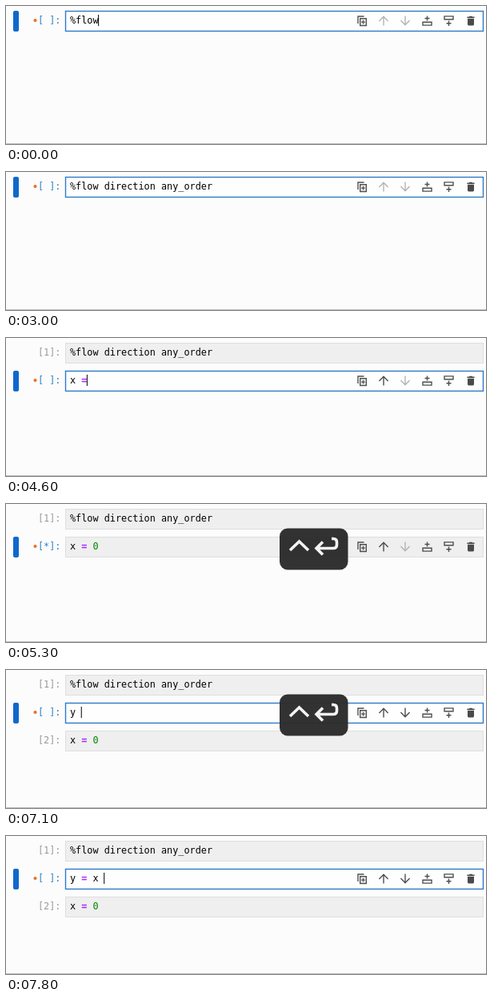
Animation, 600 px wide and 173 px high, one loop 8 s. Source, as an HTML page:

```html
<!DOCTYPE html>
<html lang="en">
<head>
<meta charset="utf-8">
<style>
html, body { margin: 0; height: 100%; overflow: hidden; background: #fcfcfc; }
svg { display: block; }
text { font: 11.83px "DejaVu Sans Mono", monospace; white-space: pre; }
.op { fill: #a2f; font-weight: bold; }
.num { fill: #080; }
.icon { fill: none; stroke: #4f4f4f; stroke-width: 1.4; }
.off { stroke: #b4b4b4; }
</style>
</head>
<body>
<svg id="stage" width="600" height="173" viewBox="0 0 600 173"></svg>
<script>
const stage = document.getElementById("stage");
const LOOP = 8000, CHAR = 7.12, TOP = 6, PITCH = 35;
const MAGIC = "%flow direction any_order";

// Each entry: [time, characters typed]
const magicKeys = [[0, 5], [100, 6], [200, 7], [300, 8], [400, 9], [500, 10], [600, 11],
  [900, 12], [1000, 14], [1100, 15], [1200, 16], [1300, 18], [1400, 19], [1500, 20], [1600, 21],
  [1900, 22], [2000, 23], [2100, 24], [2200, 25]];
const xKeys = [[4400, 1], [4500, 2], [4600, 3], [4700, 4], [4800, 5]];
const yKeys = [[7000, 1], [7100, 2], [7300, 3], [7400, 4], [7700, 5], [7800, 6]];

const typed = (text, keys, t) =>
  text.slice(0, keys.reduce((n, [at, count]) => t >= at ? count : n, 0));

const colored = code => code
  .replace(/\d/g, '<tspan class="num">$&</tspan>')
  .replace(/ =/g, ' <tspan class="op">=</tspan>');

const icon = (x, y, d, off) =>
  `<path class="icon${off ? " off" : ""}" transform="translate(${x} ${y})" d="${d}"/>`;

function toolbar(y, up, down) {
  return icon(445, y, "M-5 3.5V-5.5H2.5M-2.3-2.8H5.3V6H-2.3ZM1.5-.8V4M-.9 1.6H3.9")
    + icon(472, y, "M0 6V-5M-5.6 .4L0-5.2L5.6 .4", !up)
    + icon(499, y, "M0-6V5M-5.6-.4L0 5.2L5.6-.4", !down)
    + icon(526.5, y, "M-5.5 1.8H5.5V5.6H-5.5ZM0-6V0M-3-3H3")
    + icon(553.5, y, "M-5.5-5.6H5.5V-1.8H-5.5ZM0 0V6.5M-3 3.2H3")
    + `<path fill="#4a4a4a" transform="translate(581 ${y})"
        d="M-4.6-5H-2.2L-1.5-5.8H1.5L2.2-5H4.6V-3.6H-4.6ZM-4-2.8H4V4.6Q4 6 2.6 6H-2.6Q-4 6-4 4.6Z"/>`;
}

function cell(row, { code, prompt, active, edit, caret, up, down }) {
  const y = TOP + row * PITCH, base = y + 16;
  const [fill, line, width] = edit ? ["#fefefe", "#2d7bcb", 1.4] : ["#efefef", "#dedede", 1];
  let out = `<rect x="74.5" y="${y + .5}" width="522" height="25" fill="${fill}" stroke="${line}" stroke-width="${width}"/>`
    + `<text x="40" y="${base + .4}" fill="${active ? "#307fc1" : "#999"}">[${prompt}]:</text>`
    + `<text x="80" y="${base}">${colored(code)}</text>`;
  if (active) {
    out += `<rect x="9" y="${y}" width="7" height="26" rx="2" fill="#1068cc"/>`
      + `<circle cx="36.5" cy="${y + 12}" r="2.1" fill="#e67324"/>`
      + toolbar(y + 12.5, up, down);
  }
  if (caret) out += `<rect x="${80 + code.length * CHAR - .5}" y="${y + 5}" width="1" height="14"/>`;
  return out;
}

const keyHint = opacity => `<g opacity="${opacity}">
  <rect x="342" y="30.5" width="85.5" height="52" rx="10" fill="#2c2c2c" fill-opacity=".97"/>
  <path fill="none" stroke="#f4f4f4" stroke-width="3.6" d="M355 58L366.5 47L378 58
    M407 43.5h2q4.5 0 4.5 4.5v3q0 4.5-4.5 4.5H388M396 47.5L388 55.5L396 63.5"/></g>`;

function draw(t) {
  let out = "";
  if (t < 3400) {
    out += cell(0, { code: typed(MAGIC, magicKeys, t), prompt: " ", active: true, edit: true, caret: t < 2800 });
  } else {
    out += cell(0, { code: MAGIC, prompt: t < 3500 ? "*" : "1" });
    if (t < 5800) {
      const edit = t >= 4000 && t < 5300;
      const prompt = t < 5300 ? " " : t < 5400 ? "*" : "2";
      out += cell(1, { code: typed("x = 0", xKeys, t), prompt, active: true, edit, caret: edit, up: true });
    } else {
      const edit = t >= 6000;
      const caret = edit && (t < 6600 || t >= 7000);
      out += cell(1, { code: typed("y = x ", yKeys, t), prompt: " ", active: true, edit, caret, up: true, down: true })
        + cell(2, { code: "x = 0", prompt: "2" });
    }
  }
  if (t >= 5300 && t < 7500) out += keyHint(t < 7400 ? 1 : .5);
  stage.innerHTML = out + '<rect y="172" width="600" height="1" fill="#bdbdbd"/>';
}

let last = -1;
function tick() {
  const t = Math.floor(performance.now() % LOOP / 100) * 100;
  if (t !== last) draw(last = t);
  requestAnimationFrame(tick);
}
tick();
</script>
</body>
</html>
```
